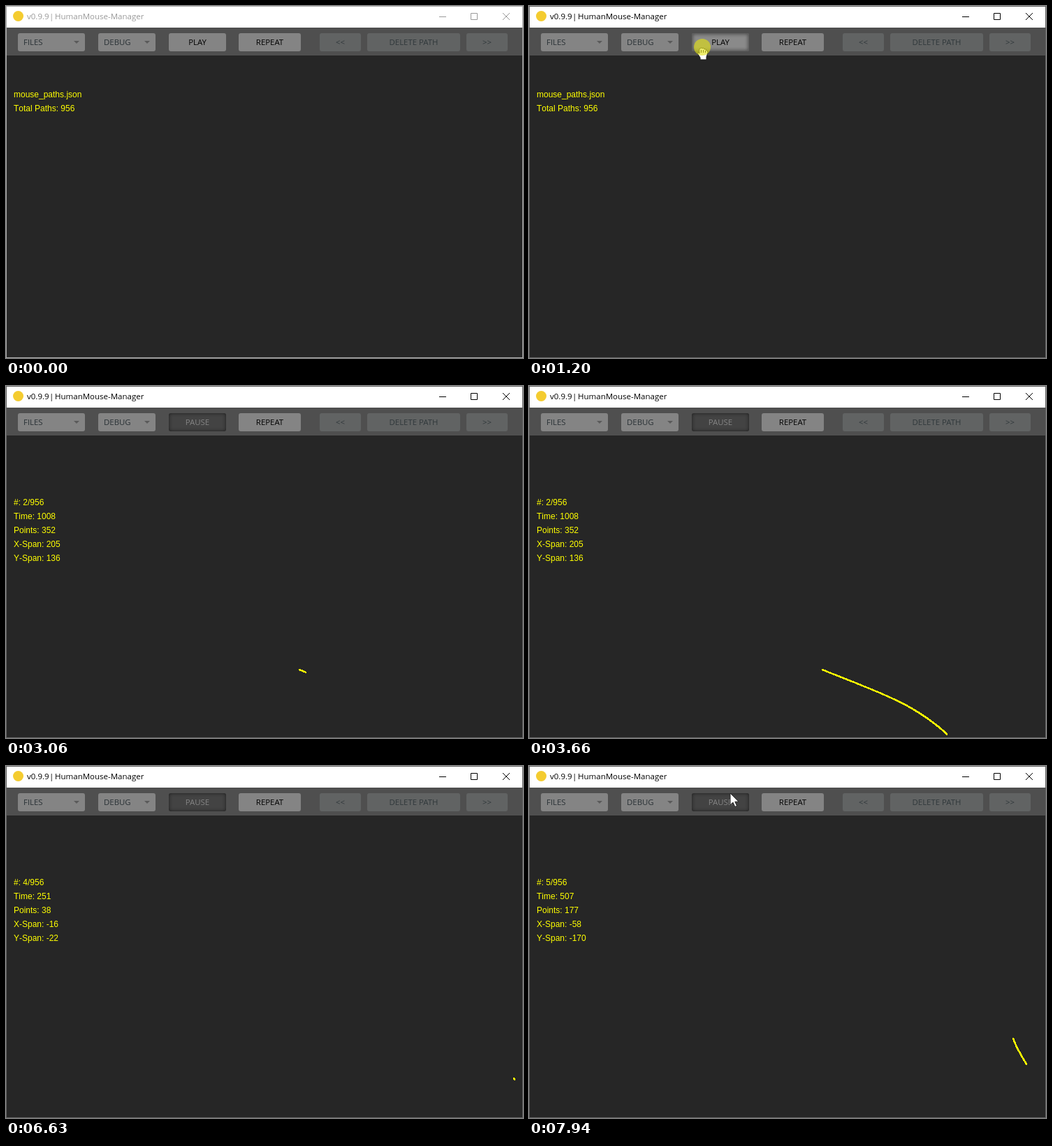
Recreate the animation shown at these times as an HTML page with a canvas. Size 740 px wide and 505 px high, loop 7990 ms.

```html
<!DOCTYPE html>
<html lang="en">
<head>
<meta charset="utf-8">
<style>
html, body { margin: 0; width: 740px; height: 505px; overflow: hidden; background: #262626; }
body { position: relative; font: 11.4px/26px "Open Sans", "Noto Sans", sans-serif; }
body * { position: absolute; box-sizing: border-box; white-space: pre; }
#title { width: 740px; height: 31px; background: #fff; color: #999; font-size: 11.5px; line-height: 30px; }
#title i { left: 10px; top: 7px; width: 15px; height: 15px; border-radius: 50%; background: #f4cc30; }
#title svg { left: 0; top: 0; fill: none; stroke: currentColor; }
#bar { top: 31px; width: 740px; height: 40px; background: #4f4f4f; }
#bar b { top: 8px; height: 26px; border-radius: 3px; background: #848484; color: #000; font-weight: 400; text-align: center; }
#bar .menu { text-align: left; padding-left: 8px; color: #2a3236; }
#bar .menu::after { content: ""; position: absolute; right: 8px; top: 11px; border: 4px solid transparent; border-top-color: #5a5a5a; border-bottom: 0; }
#bar .off { background: #616363; color: #30383b; }
#bar .hover { background: #8a8a8a; box-shadow: inset 0 0 4px 2px #555; }
#bar .down { background: #434343; color: #858585; box-shadow: inset 0 0 5px #1c1c1c; }
#info { left: 11px; font: 12px/20px "Liberation Sans", Arial, sans-serif; font-kerning: none; color: #ff0; }
#frame { width: 740px; height: 505px; border: 1px solid #aaa; }
.active #title { color: #000; }
.active #frame { border-color: #626262; }
canvas { left: 0; top: 0; }
</style>
</head>
<body>
<div id="title"><i></i><span style="left:30px">v0.9.9</span><span style="left:62px">|</span><span style="left:70px">HumanMouse-Manager</span>
<svg width="740" height="30"><path d="M620 15.5h10M665.5 10.5h9v9h-9zM711 10l10 10m0-10l-10 10"/></svg></div>
<div id="bar">
<b class="menu" style="left:17px;width:96px">FILES</b>
<b class="menu" style="left:132px;width:82px">DEBUG</b>
<b id="play" style="left:233px;width:82px">PLAY</b>
<b style="left:333px;width:89px">REPEAT</b>
<b class="off" style="left:449px;width:59px">&lt;&lt;</b>
<b class="off" style="left:517px;width:133px">DELETE PATH</b>
<b class="off" style="left:659px;width:59px">&gt;&gt;</b>
</div>
<div id="info"></div>
<div id="frame"></div>
<canvas id="view" width="740" height="505"></canvas>
<script>
const LOOP = 7990, PRESS = 1150, RELEASE = 1250;

// Each path runs from its first point over (dx, dy) in ms, slowing down by the power ease.
// lead: how far it has run when it is first shown
const paths = [
  { start: 1350, lead: 0, ms: 674, count: 296, dx: 282, dy: -252, ease: 3.8, gaps: true,
    points: [[11, 571], [175, 503], [250, 474], [301, 448], [317, 430], [310, 390]] },
  { start: 3060, lead: 40, ms: 1008, count: 352, dx: 205, dy: 136, ease: 1, points: [[419, 406], [535, 455], [602, 503]] },
  { start: 5120, lead: 0, ms: 464, count: 115, dx: 30, dy: -104, ease: 1, points: [[638, 548], [649, 503], [662, 456]] },
  { start: 6630, lead: 30, ms: 251, count: 38, dx: -16, dy: -22, ease: 1, points: [[727, 449]] },
  { start: 7890, lead: 10, ms: 507, count: 177, dx: -58, dy: -170, ease: 3.2, points: [[711, 427], [692, 390], [672, 324]] }
];
for (const { points, dx, dy } of paths) points.push([points[0][0] + dx, points[0][1] + dy]);

const hidden = [335, -20];
const moves = [   // from, until, target
  [400, 1100, [248, 59]], [1350, 1600, [250, 43]], [1650, 1950, hidden], [7590, 7940, [288, 39]]
];

const arrow = new Path2D("M0 0V17L4 13.2 6.8 19.5 9.6 18.3 6.8 12.2H12Z");
const hand = new Path2D("M-2 1Q0-1 2 1V7Q4 6 5 8 7 7 8 9 10.5 8.5 11 11V15Q11 18 9 20V23H0V20L-5 14Q-6.5 11-4 11L-2 13Z");
const fist = new Path2D("M-7 9Q-6 7-4 9-5 2-3 2-1 0 0 2 2 0 3 3 6 2 6 5 8 5 8 8L6 14V18H-3V15Z");
const knuckles = new Path2D("M-1.5 4V8M1.5 4V8M4.5 5V8");

const el = id => document.getElementById(id);
const play = el("play"), info = el("info"), g = el("view").getContext("2d");
const clamp = v => Math.max(0, Math.min(1, v));
const easeOut = (f, power) => 1 - (1 - clamp(f)) ** power;
const noise = n => Math.abs(Math.sin(n * 12.9898) * 43758.5453) % 1;

// Catmull-Rom curve through the points, u from 0 to 1
function curve(points, u) {
  const last = points.length - 1, i = Math.min(Math.floor(u * last), last - 1), f = u * last - i;
  const p = k => points[Math.max(0, Math.min(last, i + k))];
  return [0, 1].map(c => {
    const [a, b, d, e] = [-1, 0, 1, 2].map(k => p(k)[c]);
    return b + f / 2 * (d - a + f * (2 * a - 5 * b + 4 * d - e + f * (3 * (b - d) + e - a)));
  });
}

function drawPath({ start, lead, ms, ease, points, gaps }, t) {
  const end = easeOut((t - start + lead) / ms, ease);
  g.fillStyle = "#ff0";
  for (let u = 0; u <= end; u += 0.001) {
    const [x, y] = curve(points, u).map(Math.round);
    // fast strokes leave gaps between the sampled points
    if (!gaps || noise(x) < (x - 100) / 170) g.fillRect(x, y, 2, 2);
  }
}

function mouseAt(t) {
  let [x, y] = hidden;
  for (const [from, until, [tx, ty]] of moves) {
    const k = easeOut((t - from) / (until - from), 2);
    x += (tx - x) * k;
    y += (ty - y) * k;
  }
  return [x, y];
}

function drawMouse(x, y, pressed, onButton) {
  const shape = pressed ? fist : onButton ? hand : arrow;
  g.save();
  g.translate(x, y);
  g.fillStyle = "#fff";
  g.strokeStyle = "#222";
  g.fill(shape);
  g.stroke(shape);
  if (pressed) {
    g.stroke(knuckles);
    g.fillStyle = "rgba(228,226,20,.62)";
    g.beginPath();
    g.arc(0, 0, 12, 0, 7);
    g.fill();
  }
  g.restore();
}

function draw(now) {
  const time = now % LOOP;
  // the picture is taken every 50 ms, counted anew from each path
  const base = paths.reduce((b, p) => p.start <= time ? p.start : b, 0);
  const t = base + Math.floor((time - base) / 50) * 50;
  const n = paths.filter(p => p.start <= t).length, path = paths[n - 1];
  const [x, y] = mouseAt(t);
  const onButton = x > 233 && x < 315 && y > 39.5 && y < 65;
  const playing = t >= RELEASE;

  document.body.className = t >= PRESS ? "active" : "";
  play.textContent = playing ? "PAUSE" : "PLAY";
  play.className = playing ? "down" : onButton ? "hover" : "";
  info.style.top = path ? "157px" : "117px";
  info.textContent = path
    ? `#: ${n}/956\nTime: ${path.ms}\nPoints: ${path.count}\nX-Span: ${path.dx}\nY-Span: ${path.dy}`
    : "mouse_paths.json\nTotal Paths: 956";

  g.clearRect(0, 0, 740, 505);
  if (path) drawPath(path, t);
  drawMouse(x, y, t >= PRESS && t < RELEASE, onButton);
}

const begin = performance.now();
(function loop() {
  draw(performance.now() - begin);
  requestAnimationFrame(loop);
})();
</script>
</body>
</html>
```
